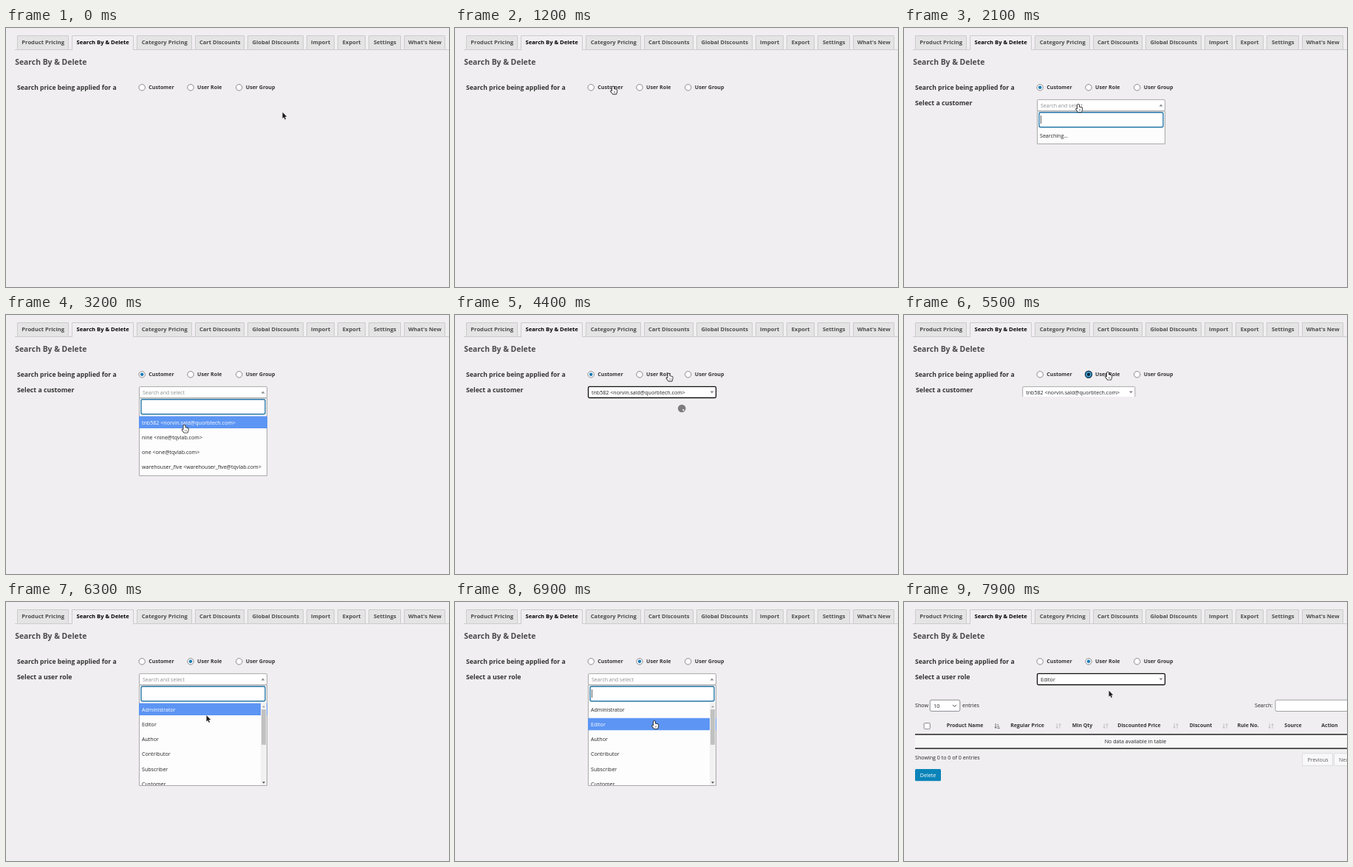
Write an HTML page with a canvas that moves like this. It is 600 px wide and 352 px high and loops after 8000 ms.

```html
<!DOCTYPE html>
<html lang="en">
<head>
<meta charset="utf-8">
<title>Search By &amp; Delete</title>
<style>
  html, body { margin: 0; width: 100%; height: 100%; overflow: hidden; background: #f0eef0; }
  canvas { display: block; }
</style>
</head>
<body>
<canvas id="stage" width="600" height="352"></canvas>
<script>
const ctx = document.getElementById('stage').getContext('2d');
const LOOP = 8000, STEP = 100;
const BG = '#f0eef0', DARK = '#242428', BLUE = '#1e7db5';
const ROW_TOP = 137, ROW_PITCH = 20.25;

const TABS = [
  ['Product Pricing', 15, 85], ['Search By & Delete', 89, 173], ['Category Pricing', 177, 252],
  ['Cart Discounts', 256, 323], ['Global Discounts', 327, 403], ['Import', 407, 445],
  ['Export', 449, 487], ['Settings', 491, 535], ["What's New", 539, 595]
];
const RADIOS = [['Customer', 184.2], ['User Role', 250], ['User Group', 315.7]];
const CUSTOMERS = [
  'tnb582 <norvin.sald@quorbtech.com>', 'nine <nine@tqvlab.com>',
  'one <one@tqvlab.com>', 'warehouser_five <warehouser_five@tqvlab.com>'
];
const ROLES = ['Administrator', 'Editor', 'Author', 'Contributor', 'Subscriber', 'Customer'];
const COLUMNS = [
  ['Product Name', 82.5, 126], ['Regular Price', 167, 209], ['Min Qty', 241.5, 273],
  ['Discounted Price', 318.5, 368], ['Discount', 402, 435], ['Rule No.', 466, 497],
  ['Source', 527, 0], ['Action', 576.5, 0]
];

// time, x, y, pointing hand
const CURSOR = [
  [0, 374.5, 114.6, 0], [300, 374.5, 114.6, 0], [1100, 216, 83, 1], [1200, 214, 79.6, 1],
  [1900, 214, 79.6, 1], [2100, 236, 104, 1], [2300, 242.5, 151, 1], [2700, 241.5, 149.7, 1],
  [3200, 241.5, 149.7, 1], [3900, 242, 154, 0], [4400, 289.4, 79.6, 1], [4800, 289.4, 79.6, 1],
  [5500, 276, 77.8, 1], [5800, 276, 77.8, 1], [6100, 270, 104, 1], [6300, 271.5, 154, 0],
  [6600, 271.5, 154, 0], [6900, 270, 162, 1], [7200, 270, 162, 1], [7500, 277, 123, 0],
  [7900, 277.5, 120.4, 0]
];

const swing = p => 0.5 - Math.cos(Math.PI * Math.min(1, Math.max(0, p))) / 2;
const within = (t, from, to) => t >= from && t < to;

function text(s, x, y, size = 7.1, color = DARK, weight = 400, align = 'left') {
  ctx.font = `${weight} ${size}px "Open Sans", sans-serif`;
  ctx.fillStyle = color;
  ctx.textAlign = align;
  ctx.fillText(s, x, y);
}

function box(x, y, w, h, fill, stroke, line = 1, radius = 0) {
  ctx.beginPath();
  ctx.roundRect(x, y, w, h, radius);
  if (fill) { ctx.fillStyle = fill; ctx.fill(); }
  if (stroke) { ctx.strokeStyle = stroke; ctx.lineWidth = line; ctx.stroke(); }
}

function disc(x, y, r, fill, stroke, line = 1) {
  box(x - r, y - r, 2 * r, 2 * r, fill, stroke, line, r);
}

function shape(points, fill, stroke, line = 1) {
  ctx.beginPath();
  points.forEach(([x, y]) => ctx.lineTo(x, y));
  ctx.closePath();
  if (stroke) { ctx.strokeStyle = stroke; ctx.lineWidth = line; ctx.stroke(); }
  ctx.fillStyle = fill;
  ctx.fill();
}

function triangle(x, y, up, color, r = 2.4) {
  const d = up ? -r * 0.65 : r * 0.65;
  shape([[x - r, y - d], [x + r, y - d], [x, y + d]], color);
}

function clipped(x, y, w, h, draw) {
  ctx.save();
  ctx.beginPath();
  ctx.rect(x, y, w, h);
  ctx.clip();
  draw();
  ctx.restore();
}

function drawHeader() {
  ctx.fillStyle = '#ccc';
  ctx.fillRect(12, 29, 588, 1);
  TABS.forEach(([label, left, right], i) => {
    const active = i === 1;
    box(left + 0.5, 10.5, right - left - 1, 19, active ? BG : '#e4e4e4', '#ccc');
    if (active) { ctx.fillStyle = BG; ctx.fillRect(left + 1, 29, right - left - 2, 2); }
    text(label, (left + right) / 2 + 0.2, 22.3, 7.6, active ? '#000' : '#4c4c4e', 700, 'center');
  });
  text('Search By & Delete', 12.3, 50.3, 10.35, '#4a4a4c', 700);
}

function drawRadios(chosen, focused) {
  text('Search price being applied for a', 15, 83.6, 8.6, '#333', 700);
  RADIOS.forEach(([label, x], i) => {
    const on = i === chosen;
    if (on && focused) {
      disc(x, 80.8, 4.5, '#49a9dc', '#17394f', 1.4);
      disc(x, 80.8, 2.3, '#0f2c40');
    } else {
      disc(x, 80.8, 4.2, '#fff', '#7c7c82', 0.9);
      if (on) disc(x, 80.8, 2.3, BLUE);
    }
    text(label, x + 9.1, 83.3, 7.05, '#303032', 700);
  });
}

// k is how far the row has unfolded, 0 to 1
function drawSelectRow(label, value, k, open, focused) {
  if (k <= 0) return;
  const x = 15 + 165 * k, w = 174 * k;
  clipped(0, 90, 600, 24 * k + (k === 1 ? 1 : 0), () => {
    text(label, k < 1 ? 16 : 15, 104.8, 8.75, '#333', 700);
    box(x + 0.5, 97.4, w - 1, 15.1, '#fff', focused ? '#111' : '#aaa', focused ? 1.3 : 1, 1.5);
    triangle(x + w - 6, 105, open, '#888');
    clipped(x, 97, Math.max(0, w - 11), 16, () =>
      text(value || 'Search and select', x + 5, 107.7, value ? 7.1 : 7, value ? DARK : '#8e8e92'));
  });
}

function drawDropdown(items, bottom, hover, { caret = false, scroll = false } = {}) {
  box(180.5, 113, 173, bottom - 113.5, '#fdfdfd', '#aaa');
  box(183, 114.8, 168, 20, '#fff', '#2777a8', 1.4, 2);
  if (caret) { ctx.fillStyle = '#333'; ctx.fillRect(185, 119, 0.8, 11); }
  clipped(180, ROW_TOP, 174, bottom - ROW_TOP - 1, () => {
    items.forEach((item, i) => {
      const y = ROW_TOP + i * ROW_PITCH;
      if (i === hover) { ctx.fillStyle = '#5c95f3'; ctx.fillRect(180, y + 0.5, 174, 16.5); }
      text(item, 184, y + 11.5, 7.1, i === hover ? '#fff' : DARK);
    });
    if (scroll) {
      box(345, ROW_TOP, 8, bottom - ROW_TOP, '#f1f1f1');
      box(346, 146, 6, 48, '#c1c1c1');
      triangle(349, 142, true, '#a3a3a3', 2);
      triangle(349, 245.5, false, '#505050', 2);
    }
  });
}

function drawSortIcon(x, active) {
  const color = active ? '#77777c' : '#c3c3c7';
  ctx.fillStyle = color;
  ctx.fillRect(x - 2.4, 165, 1, 6);
  triangle(x - 1.9, 171, false, color, 1.8);
  if (active) {
    [1.5, 2.5, 3.5].forEach((w, i) => ctx.fillRect(x + 0.4, 166 + i * 2.4, w, 1.2));
  } else {
    ctx.fillRect(x + 1.5, 166, 1, 6);
    triangle(x + 2, 166, true, color, 1.8);
  }
}

function drawTable(rows) {
  const top = 180, end = top + Math.max(1, rows) * 20 - (rows ? 0 : 1);
  text('Show', 15, 142.9);
  box(35.2, 133.2, 40.6, 15.2, '#fff', '#808086', 0.9, 2);
  text('10', 40, 143.5, 7.3);
  ctx.beginPath();
  ctx.moveTo(66, 139.8); ctx.lineTo(68.5, 142.3); ctx.lineTo(71, 139.8);
  ctx.strokeStyle = '#444'; ctx.lineWidth = 1; ctx.stroke();
  text('entries', 79, 142.9);
  text('Search:', 475, 142.9);
  box(503, 133.2, 110, 15.3, '#fff', '#98989e', 0.9, 2);

  const checkbox = y => box(27.1, y, 8.2, 8.2, '#fff', '#7c7c82', 0.9, 1.5);
  checkbox(164.5);
  COLUMNS.forEach(([label, x, icon], i) => {
    text(label, x, 169.9, 6.95, '#333', 700, 'center');
    if (icon) drawSortIcon(icon, i === 0);
  });

  box(15, top, 585, end - top, '#f8f7f8');
  for (let i = 0; i < rows; i++) {
    const y = top + i * 20, price = 20 + i * 5;
    if (i % 2) box(15, y, 585, 20, BG);
    checkbox(y + 5.5);
    [`Product ${i + 1}`, price, 1, price - 5, 5, i + 1, 'Direct', 'Edit'].forEach((cell, c) =>
      text(cell, COLUMNS[c][1], y + 12.2, 7, DARK, 400, 'center'));
  }
  if (!rows) text('No data available in table', 313.5, 191.6, 7.1, DARK, 400, 'center');
  [top, end].forEach(y => box(15, y - 0.75, 585, 1.5, '#222'));

  text(`Showing ${rows && 1} to ${rows} of ${rows} entries`, 15, end + 15.4);
  [539.5, 582.5].forEach(x => box(x, end + 6.8, 41, 16.5, '#f9f8f9', '#dcdcdf'));
  text('Previous', 560.5, end + 17.8, 7.1, '#5e5e63', 400, 'center');
  text('Next', 589, end + 17.8, 7.1, '#5e5e63');
  box(15, end + 28, 35, 16.2, '#0b84b9', null, 1, 1.5);
  text('Delete', 32.5, end + 38.6, 7.2, '#fff', 400, 'center');
}

function drawSpinner(t) {
  const a = Math.PI / 4 + (t - 4400) / 700 * 2 * Math.PI;
  disc(307.2, 127, 5.3, '#7b7b7f');
  disc(307.2 + 3 * Math.cos(a), 127 + 3 * Math.sin(a), 1.2, '#f4f4f4');
}

function cursorAt(t) {
  const i = CURSOR.findLastIndex(key => key[0] <= t);
  const a = CURSOR[i], b = CURSOR[i + 1] || a;
  const p = a === b ? 0 : swing((t - a[0]) / (b[0] - a[0]));
  return { x: a[1] + (b[1] - a[1]) * p, y: a[2] + (b[2] - a[2]) * p, hand: a[3] };
}

function drawCursor({ x, y, hand }) {
  ctx.save();
  ctx.translate(x, y);
  ctx.lineJoin = 'round';
  if (hand) {
    shape([[-1, 0.5], [0, -0.2], [1, 0.5], [1.2, 3.4], [4.6, 4.2], [5.4, 5.2], [5, 8],
      [4.2, 10], [-0.2, 10], [-3, 6.4], [-2.6, 5.6], [-1, 6.4]], '#fff', '#222', 1.6);
    ctx.fillStyle = '#555';
    [1, 2.6].forEach(line => ctx.fillRect(line, 6.4, 0.6, 2.2));
  } else {
    shape([[0, 0], [0, 8.4], [1.9, 6.7], [3.2, 9.8], [4.5, 9.2], [3.2, 6.2], [5.8, 6]],
      '#1c1c1c', '#fff', 1);
  }
  ctx.restore();
}

function draw(t) {
  const cursor = cursorAt(t);
  const hover = Math.max(0, Math.floor((cursor.y - ROW_TOP) / ROW_PITCH));

  ctx.fillStyle = BG;
  ctx.fillRect(0, 0, 600, 352);
  drawHeader();

  const chosen = t < 1300 ? -1 : t < 5400 ? 0 : 1;
  drawRadios(chosen, within(t, 1300, 2100) || within(t, 5400, 6200));

  const customerOpen = within(t, 2100, 3800), roleOpen = within(t, 6200, 7200);
  const customerRow = t < 5410 ? swing((t - 1200) / 400) : 1 - swing((t - 5410) / 400);
  drawSelectRow('Select a customer', t >= 3800 && CUSTOMERS[0], customerRow,
    customerOpen, within(t, 3800, 5400));
  drawSelectRow('Select a user role', t >= 7200 && ROLES[1], swing((t - 5800) / 300),
    roleOpen, t >= 7200);

  if (within(t, 4900, 5400)) drawTable(6);
  if (t >= 7600) drawTable(0);
  if (within(t, 3900, 4900) || within(t, 7300, 7600)) drawSpinner(t);

  if (customerOpen) {
    const caret = within(t, 2100, 2500) || within(t, 2900, 3100);
    if (t < 3100) drawDropdown(['Searching…'], 158, -1, { caret });
    else drawDropdown(CUSTOMERS, 219, hover);
  }
  if (roleOpen) drawDropdown(ROLES, 250, hover, { scroll: true, caret: within(t, 6700, 7200) });

  drawCursor(cursor);
}

function frame() {
  const t = performance.now() % LOOP;
  draw(Math.floor(t / STEP) * STEP);
  requestAnimationFrame(frame);
}
frame();
</script>
</body>
</html>
```
